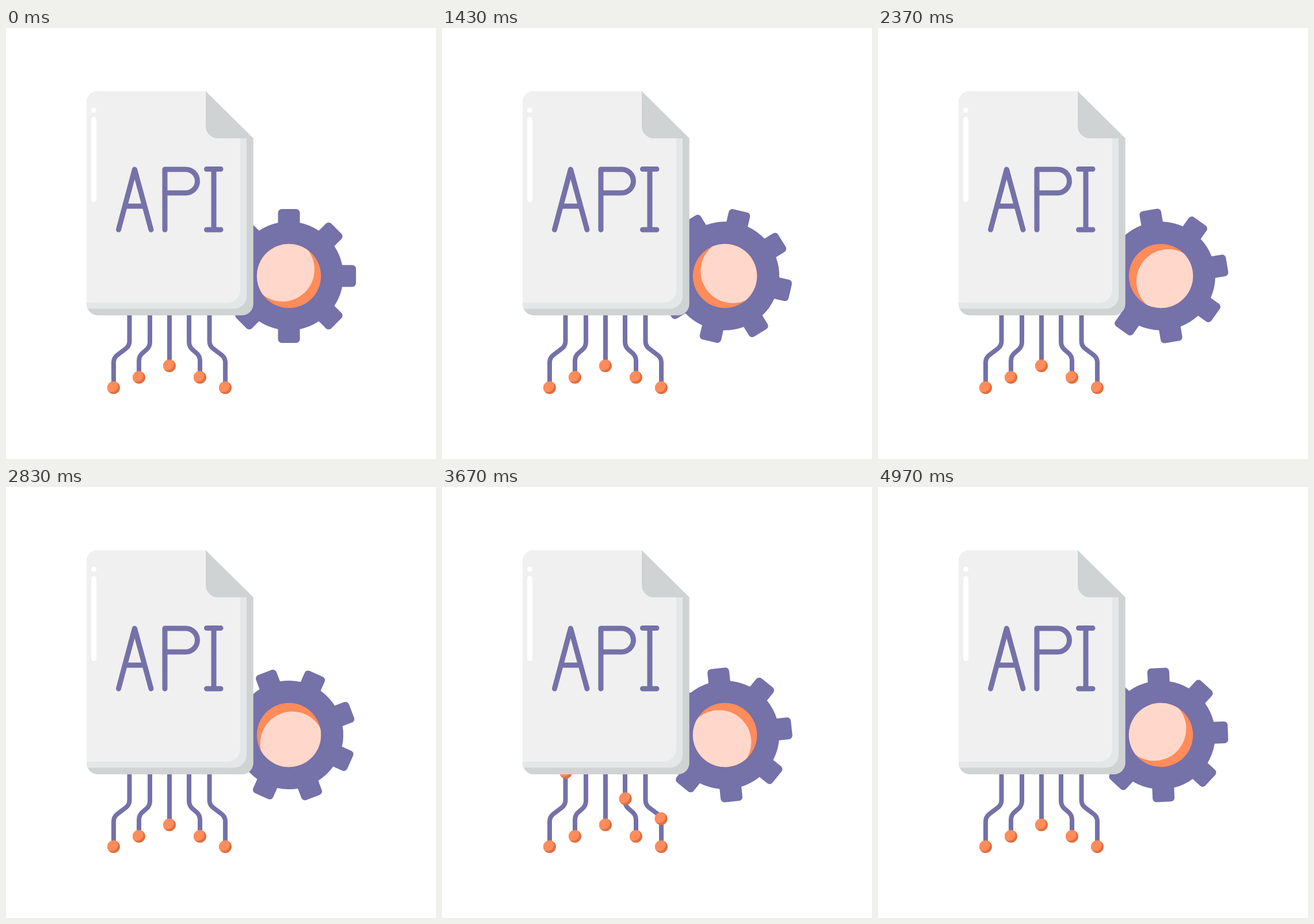
Recreate the animation shown at these times as an HTML page with a canvas. Size 747 px wide and 750 px high, loop 5.01 s.

```html
<!DOCTYPE html>
<html lang="en">
<head>
<meta charset="utf-8">
<title>API</title>
<style>
html, body { margin: 0; width: 100%; height: 100%; overflow: hidden; background: #fff; }
canvas { display: block; }
</style>
</head>
<body>
<canvas id="stage" width="747" height="750"></canvas>
<script>
const ctx = document.getElementById('stage').getContext('2d');
const LOOP = 5010, FRAMES = 150, SPEED = 8.08, MID = 284;
const VIOLET = '#7571a9', ORANGE = '#ff8c5a', RUST = '#de7043', PINK = '#ffd8cb';
const PAGE = '#f0f0f0', MIST = '#e3e7e7', GREY = '#cfd3d3';

// Wires fan out from the middle: rank 0 is straight, side is -1 or 1.
function makeWire(rank, side) {
  const low = MID + side * (9 + 44 * rank), high = MID + side * (-1.5 + 35.5 * rank);
  const lowY = 568 + 3 * rank, highY = 556 - 1.5 * rank;
  const x = rank ? low : MID, y = 588 + (rank ? 2 + 18 * rank : 0);
  const len = Math.hypot(low - high, lowY - highY), r = 8;
  const ux = (high - low) / len * r, uy = (highY - lowY) / len * r;
  const bend = `V${lowY + r}Q${low} ${lowY} ${low + ux} ${lowY + uy}` +
    `L${high - ux} ${highY - uy}Q${high} ${highY} ${high} ${highY - r}`;
  const d = `M${x} ${y}${rank ? bend : ''}V440`;
  const guide = document.createElementNS('http://www.w3.org/2000/svg', 'path');
  guide.setAttribute('d', d);
  return { x, y, rank, side, guide, length: guide.getTotalLength(), shape: new Path2D(d) };
}

const wires = [makeWire(0, -1)];
for (const side of [-1, 1]) for (const rank of [1, 2]) wires.push(makeWire(rank, side));

// Pulses leave the middle first, then the left, then the right; two waves per loop.
function startFrame(wire, wave) {
  const right = wire.side > 0 ? 1 : 0;
  return 5.4 + 2.9 * wire.rank + 9.6 * right + wave * (81.2 + 1.8 * right);
}

function disc(x, y, r, fill) {
  ctx.fillStyle = fill;
  ctx.beginPath();
  ctx.arc(x, y, r, 0, Math.PI * 2);
  ctx.fill();
}

// A disc with a second one shifted over it, cut to the first.
function shadedDisc(x, y, r, base, light, shift) {
  ctx.save();
  disc(x, y, r, base);
  ctx.clip();
  disc(x - shift, y - shift, r, light);
  ctx.restore();
}

function node(x, y) {
  shadedDisc(x, y, 11, RUST, ORANGE, 3.6);
}

function box(x, y, w, h, radii, fill) {
  ctx.fillStyle = fill;
  ctx.beginPath();
  ctx.roundRect(x, y, w, h, radii);
  ctx.fill();
}

function drawGear(angle) {
  ctx.save();
  ctx.translate(491.5, 431.5);
  ctx.rotate(angle);
  disc(0, 0, 94.5, VIOLET);
  for (let i = 0; i < 8; i++) {
    box(-19, -116.5, 38, 40, [6.5, 6.5, 0, 0], VIOLET);
    ctx.rotate(Math.PI / 4);
  }
  shadedDisc(0, 0, 55.7, ORANGE, PINK, 11.3);
  ctx.restore();
}

function drawWires(frame) {
  ctx.strokeStyle = VIOLET;
  ctx.lineWidth = 8;
  ctx.lineCap = 'butt';
  for (const wire of wires) ctx.stroke(wire.shape);
  for (const wire of wires) {
    node(wire.x, wire.y);
    for (let wave = 0; wave < 2; wave++) {
      const s = (frame - startFrame(wire, wave)) * SPEED;
      if (s <= 0 || s >= wire.length) continue;
      const p = wire.guide.getPointAtLength(s);
      node(p.x + 0.7, p.y + 1.3);
    }
  }
}

const sheet = new Path2D('M160 110H347L429.7 192V480A20 20 0 0 1 409.7 500H160A20 20 0 0 1 140 480V130A20 20 0 0 1 160 110Z');
const fold = new Path2D('M347 110L430 192H368A21 21 0 0 1 347 171Z');
const letters = new Path2D(
  'M195.5 351L223.5 246L252 351M207 310H241' +
  'M276 351V246H312A20.5 20.5 0 0 1 312 287H276' +
  'M348.5 245.5H373M361 245.5V351M348.5 351H373');

function drawPage() {
  ctx.save();
  ctx.clip(sheet);
  ctx.fillStyle = GREY;
  ctx.fillRect(140, 110, 290, 390);
  box(140, 110, 278, 378.5, [0, 0, 22, 0], MIST);
  box(140, 110, 267, 368, [0, 0, 22, 0], PAGE);
  ctx.fillStyle = GREY;
  ctx.fill(fold);
  ctx.restore();
  disc(152.5, 143, 4.6, '#fff');
  box(148, 155, 9, 148, 4.5, '#fff');
  ctx.strokeStyle = VIOLET;
  ctx.lineWidth = 9;
  ctx.lineCap = ctx.lineJoin = 'round';
  ctx.stroke(letters);
}

function render(now) {
  const t = Math.floor((now % LOOP) / 10) * 10;
  const frame = Math.min(FRAMES - 1, Math.floor((t + 4) * 0.03));
  ctx.fillStyle = '#fff';
  ctx.fillRect(0, 0, 747, 750);
  drawGear(frame / FRAMES * Math.PI * 2);
  drawWires(frame);
  drawPage();
}

const begin = performance.now();
function tick() {
  render(performance.now() - begin);
  requestAnimationFrame(tick);
}
tick();
</script>
</body>
</html>
```
